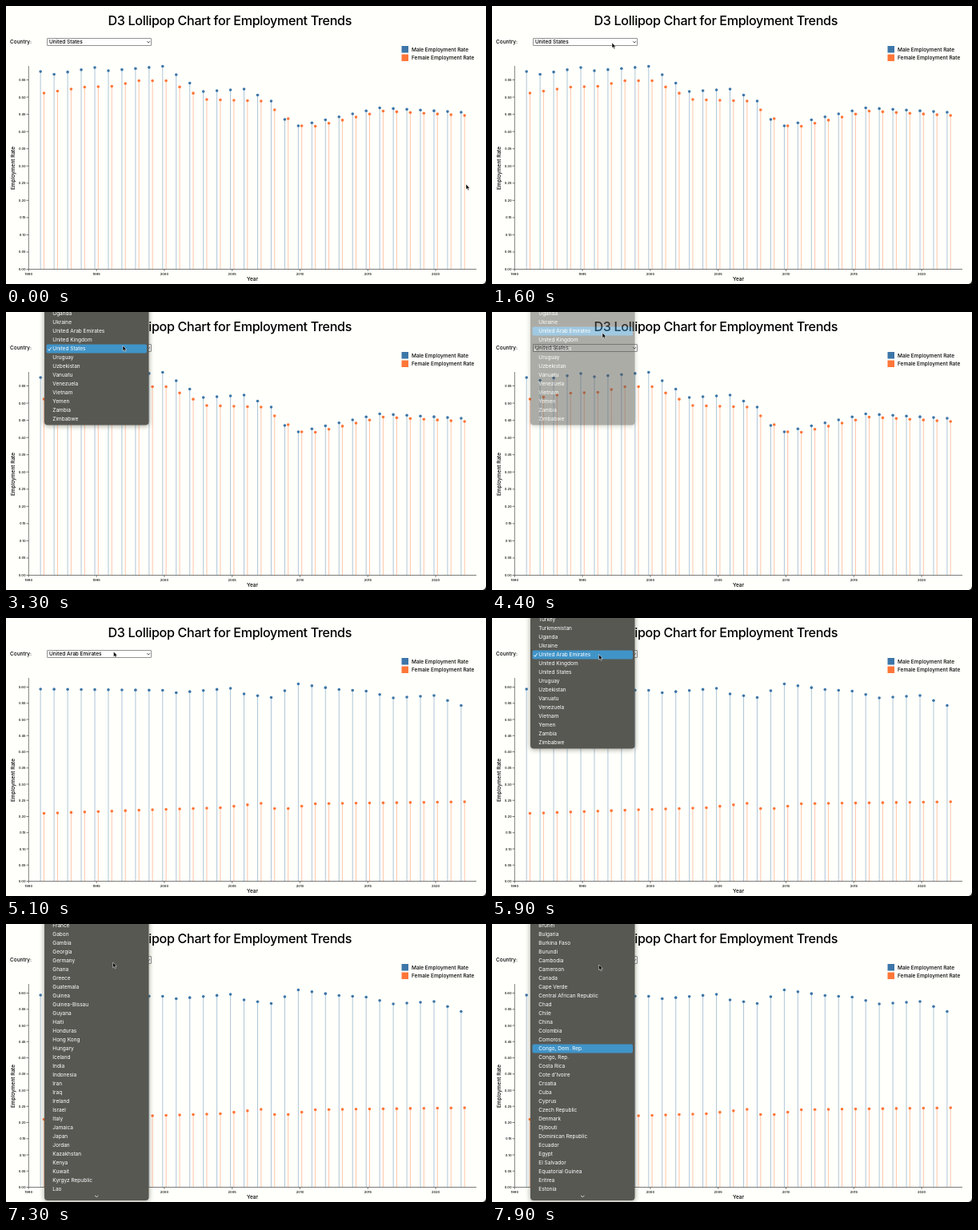
These frames come from a looping animation (600 px wide and 348 px high, 8 s). An HTML page:

```html
<!DOCTYPE html>
<html lang="en">
<head>
<meta charset="utf-8">
<title>Employment Trends</title>
<style>
html, body { margin: 0; width: 100%; height: 100%; overflow: hidden; background: #fffffb; }
svg { display: block; width: 600px; height: 348px; }
text { font: 500 6.5px Inter, Roboto, sans-serif; fill: #000; white-space: pre; }
.title { font-size: 16.13px; letter-spacing: -.02em; }
.mid { text-anchor: middle; }
.tick { font-size: 4.1px; }
.end { text-anchor: end; }
.axis { stroke: #222; stroke-width: .6; fill: none; }
.stem { stroke-width: .7; stroke-opacity: .6; }
#menu { filter: drop-shadow(0 1.5px 3px rgba(40, 40, 20, .45)); }
#menu text { fill: #fff; font-weight: 400; }
</style>
</head>
<body>
<svg viewBox="0 0 600 348">
  <text class="title mid" x="279.8" y="24">D3 Lollipop Chart for Employment Trends</text>
  <text x="5" y="47.3">Country:</text>
  <rect x="51.5" y="40.5" width="130" height="9" rx=".5" fill="#fff" stroke="#777" stroke-width=".8"/>
  <text id="choice" x="54" y="47.3"></text>
  <path d="M176.3 44.2l1.8 1.8 1.8-1.8" fill="none" stroke="#222" stroke-width=".8"/>
  <rect x="494.5" y="50" width="8.5" height="8.5" fill="#3d76a8"/>
  <rect x="494.5" y="60.5" width="8.5" height="8.5" fill="#ff7638"/>
  <text x="507" y="56.6">Male Employment Rate</text>
  <text x="507" y="67.1">Female Employment Rate</text>
  <g id="charts"></g>
  <path class="axis" d="M28.3 75V329.5H588"/>
  <text class="mid" x="308" y="344.4">Year</text>
  <text class="mid" transform="translate(11.4 203) rotate(-90)">Employment Rate</text>
  <g id="menu">
    <rect id="panel" x="48" y="-10" width="130.5" rx="4" fill="#585853"/>
    <rect id="hover" x="50.5" width="125.5" height="11" rx="2" fill="#4094c8"/>
    <path id="check" d="M0 0l1.4 1.8 2.6-4" fill="none" stroke="#fff" stroke-width=".9"/>
    <g id="rows"></g>
    <path id="more" d="M111 340l2.2 1.7 2.2-1.7" fill="none" stroke="#eee" stroke-width=".8"/>
  </g>
  <path id="cursor" d="M0 0V6.6L1.5 5.3 2.6 7.8 3.8 7.3 2.7 4.9H4.7Z" fill="#000" stroke="#fff" stroke-width=".5"/>
  <path d="M600 343Q599.5 347.5 595.5 348H600Z" fill="#222"/>
</svg>
<script>
const $ = id => document.getElementById(id);
const BASE = 329.5, ROW = 11, ROWS = 31, LOOP = 8000;

const countries = `Brunei|Bulgaria|Burkina Faso|Burundi|Cambodia|Cameroon|Canada|Cape Verde|Central African Republic|Chad|Chile|China|Colombia|Comoros|Congo, Dem. Rep.|Congo, Rep.|Costa Rica|Cote d'Ivoire|Croatia|Cuba|Cyprus|Czech Republic|Denmark|Djibouti|Dominican Republic|Ecuador|Egypt|El Salvador|Equatorial Guinea|Eritrea|Estonia|Eswatini|Ethiopia|Fiji|Finland|France|Gabon|Gambia|Georgia|Germany|Ghana|Greece|Guatemala|Guinea|Guinea-Bissau|Guyana|Haiti|Honduras|Hong Kong|Hungary|Iceland|India|Indonesia|Iran|Iraq|Ireland|Israel|Italy|Jamaica|Japan|Jordan|Kazakhstan|Kenya|Kuwait|Kyrgyz Republic|Lao|Latvia|Lebanon|Lesotho|Liberia|Libya|Lithuania|Luxembourg|Madagascar|Malawi|Malaysia|Maldives|Mali|Malta|Mauritania|Mauritius|Mexico|Moldova|Mongolia|Montenegro|Morocco|Mozambique|Myanmar|Namibia|Nepal|Netherlands|New Zealand|Nicaragua|Niger|Nigeria|North Korea|North Macedonia|Norway|Oman|Pakistan|Panama|Papua New Guinea|Paraguay|Peru|Philippines|Poland|Portugal|Qatar|Romania|Russia|Rwanda|Saudi Arabia|Senegal|Serbia|Sierra Leone|Singapore|Slovak Republic|Slovenia|Solomon Islands|Somalia|South Africa|South Korea|Spain|Sri Lanka|Sudan|Suriname|Sweden|Switzerland|Syria|Tajikistan|Tanzania|Thailand|Togo|Tonga|Trinidad and Tobago|Tunisia|Turkey|Turkmenistan|Uganda|Ukraine|United Arab Emirates|United Kingdom|United States|Uruguay|Uzbekistan|Vanuatu|Venezuela|Vietnam|Yemen|Zambia|Zimbabwe`.split('|');
const last = countries.length - 1;
const index = name => countries.indexOf(name);
const US = index('United States'), UAE = index('United Arab Emirates'), CONGO = index('Congo, Dem. Rep.');

const smooth = p => p * p * (3 - 2 * p);

// Interpolates keys of the form [time, ...values].
function track(keys, t, ease = p => p) {
  const i = keys.findIndex(k => k[0] > t);
  if (i < 0) return keys[keys.length - 1].slice(1);
  if (i === 0) return keys[0].slice(1);
  const a = keys[i - 1], b = keys[i], p = ease((t - a[0]) / (b[0] - a[0]));
  return a.slice(1).map((v, j) => v + (b[j + 1] - v) * p);
}

// Turning points [year, y] of each trend; scale is pixels per unit of rate.
const charts = [
  { scale: 430.9,
    male: [[1991, 82], [1992, 85.5], [1995, 77], [1996, 81], [2000, 75.5], [2003, 107], [2006, 104], [2008, 119], [2009, 142], [2010, 150], [2016, 127.5], [2022, 133]],
    female: [[1991, 109], [1994, 101.5], [1996, 100.5], [1998, 93.5], [2000, 93.5], [2003, 117], [2007, 119], [2009, 141], [2010, 150], [2011, 150.5], [2016, 131.5], [2022, 137]] },
  { scale: 405,
    male: [[1991, 89], [2000, 90.5], [2001, 93.5], [2005, 88], [2006, 95], [2008, 99.5], [2010, 82.5], [2013, 89.5], [2015, 91.5], [2017, 100], [2020, 97], [2022, 109.5]],
    female: [[1991, 244.5], [2000, 239.5], [2004, 237.5], [2007, 232], [2008, 238.5], [2009, 238.5], [2011, 232.5], [2022, 230]] }
];

const yearX = year => 28.3 + (year - 1990) * 16.96;

function lollipops(trend, dx, color) {
  let out = '';
  for (let year = 1991; year <= 2022; year++) {
    const x = yearX(year) + dx, [y] = track(trend, year);
    out += `<path class="stem" stroke="${color}" d="M${x} ${BASE}V${y}"/><circle cx="${x}" cy="${y}" r="1.8" fill="${color}"/>`;
  }
  return out;
}

function chart({ scale, male, female }) {
  let out = '<g>';
  for (let i = 0; BASE - i * .05 * scale > 75; i++) {
    const y = BASE - i * .05 * scale;
    out += `<path class="axis" d="M25.6 ${y}H28.3"/><text class="tick end" x="24.6" y="${y + 1.5}">${(i * .05).toFixed(2)}</text>`;
  }
  for (let year = 1990; year <= 2020; year += 5) {
    const x = yearX(year);
    out += `<path class="axis" d="M${x} ${BASE}V332"/><text class="tick mid" x="${x}" y="336.6">${year}</text>`;
  }
  return out + lollipops(male, -2.1, '#3d76a8') + lollipops(female, 2.2, '#ff7638') + '</g>';
}

$('charts').innerHTML = charts.map(chart).join('');
$('rows').innerHTML = Array.from({ length: ROWS }, (_, k) => `<text x="58.3" y="${k * ROW + 4.4}"></text>`).join('');
const groups = [...$('charts').children], rows = [...$('rows').children];

const pointer = [
  [300, 575, 223], [1500, 150, 46], [2300, 150, 46], [3200, 146, 42], [3500, 146, 42],
  [4100, 138, 26], [4600, 138, 26], [5300, 133.6, 46], [6800, 133.6, 45], [7800, 133.6, 51]
];
const lastRowAt = name => 30 + last - index(name);
const scroll = [[5950, 14], [6800, lastRowAt('Norway')], [7850, lastRowAt('Estonia')]];

const show = (el, on) => el.style.display = on ? '' : 'none';

function drawMenu(t, cursorY) {
  const first = t < 5000;
  const opacity = first ? (t < 2000 ? 0 : track([[4300, 1], [4500, 0]], t)[0]) : +(t >= 5500);
  show($('menu'), opacity > 0);
  if (!opacity) return;
  $('menu').style.opacity = opacity;

  const end = first ? 12 : Math.round(track(scroll, t)[0]);
  const rowOf = item => item - last + end;
  $('panel').setAttribute('height', Math.min(end * ROW + 9.5, 346) + 10);
  show($('more'), end > 30);
  rows.forEach((row, k) => row.textContent = countries[last - end + k] || '');

  // The highlight sticks to its row while the list scrolls.
  const hot = first ? Math.floor((cursorY + 3.5) / ROW) : rowOf(rowOf(CONGO) >= 5 ? CONGO : UAE);
  show($('hover'), hot >= 0 && hot < ROWS);
  $('hover').setAttribute('y', hot * ROW - 3.5);
  const mark = rowOf(first ? US : UAE);
  show($('check'), mark >= 0 && mark < ROWS);
  $('check').setAttribute('transform', `translate(52.5 ${mark * ROW + 2.5})`);
}

function frame() {
  const t = performance.now() % LOOP;
  const [x, y] = track(pointer, t, smooth);
  const current = t < 4600 ? 0 : 1;
  groups.forEach((g, i) => show(g, i === current));
  $('choice').textContent = countries[current ? UAE : US];
  drawMenu(t, y);
  $('cursor').setAttribute('transform', `translate(${x} ${y})`);
  requestAnimationFrame(frame);
}
frame();
</script>
</body>
</html>
```
